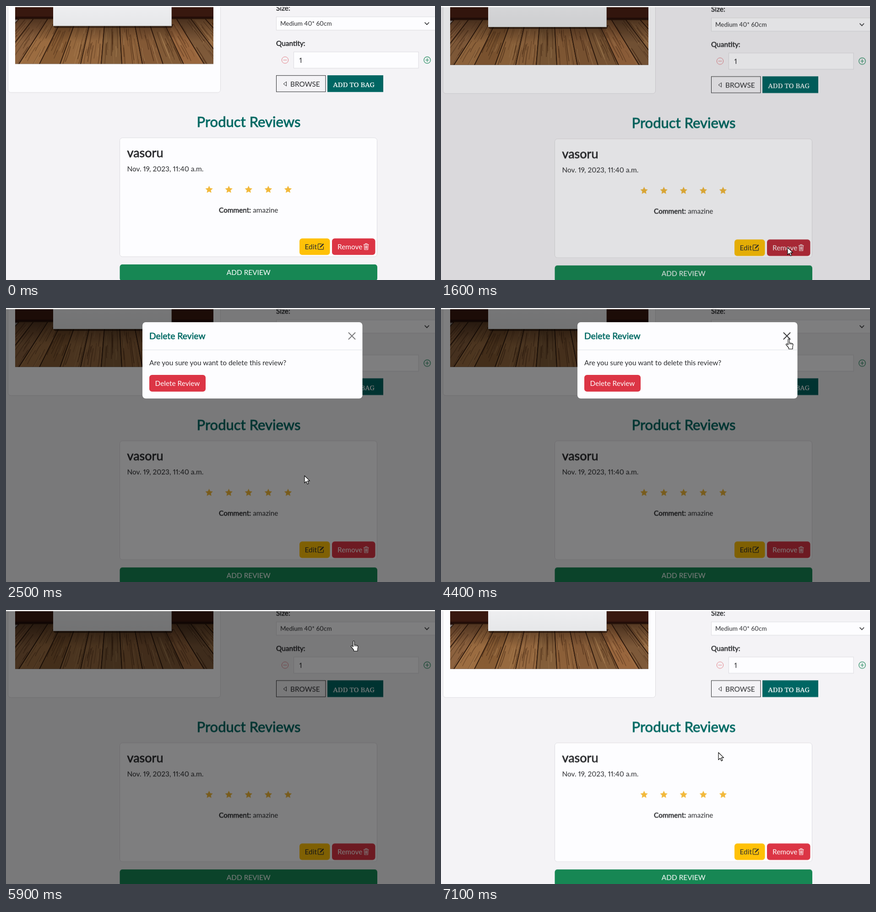
These frames come from a looping animation (937x598 px, 7200 ms). An HTML page:

```html
<!DOCTYPE html>
<html lang="en">
<head>
<meta charset="utf-8">
<title>Delete review</title>
<style>
  html, body { margin: 0; width: 100%; height: 100%; overflow: hidden; background: #f4f3f6; }
  svg { display: block; }
  text { font: 15.4px Lato, sans-serif; font-variant-numeric: proportional-nums; fill: currentColor; }
  .strong { stroke: currentColor; stroke-width: .55px; }
  .h2 { font-size: 31px; stroke-width: .9px; }
  .h3 { font-size: 27px; stroke-width: .8px; }
  .h5 { font-size: 19.3px; stroke-width: .6px; }
  .small { font-size: 13.5px; }
  .serif { font: 15px "Noto Serif", serif; stroke: currentColor; stroke-width: .2px; }
  .mid { text-anchor: middle; }
  .panel { fill: #fdfdff; stroke: #dddce0; }
  .line { fill: none; stroke: currentColor; }

  #page, #backdrop, #modal, #mouse, #remove, #close, .arrow, .hand {
    animation: 7200ms step-end infinite;
  }
  #page { animation-name: scroll; }
  #backdrop { animation-name: dim; }
  #modal { animation-name: dialog; }
  #remove { animation-name: remove; }
  #close { animation-name: close; }
  #mouse { animation-name: travel; }
  .arrow { animation-name: arrow; }
  .hand { animation-name: hand; }

  @keyframes scroll {
    0% { transform: translateY(-2.3px); }
    12.5%, 100% { transform: none; }
  }
  @keyframes dim {
    0% { opacity: 0; }
    22.222% { opacity: .107; }
    23.611% { opacity: .44; }
    25% { opacity: .5; }
    83.333% { opacity: .39; }
    84.722% { opacity: .055; }
    86.111%, 100% { opacity: 0; }
  }
  @keyframes dialog {
    0% { opacity: 0; transform: translateY(-48px); }
    25% { opacity: .55; transform: translateY(-28px); }
    26.388% { opacity: 1; transform: translateY(-9px); }
    27.777% { opacity: 1; transform: none; }
    79.166% { opacity: .78; transform: translateY(-9px); }
    80.555% { opacity: .11; transform: translateY(-31px); }
    81.944%, 100% { opacity: 0; transform: translateY(-48px); }
  }
  @keyframes remove {
    0% { fill: #dc3545; }
    15.277% { fill: #bb2d3b; }
    23.611%, 100% { fill: #dc3545; }
  }
  @keyframes close {
    0% { color: #7b7b7d; }
    58.333%, 100% { color: #3c3c3e; }
  }
  @keyframes travel {
    0% { transform: translate(800px, 600px); }
    6.944% { transform: translate(800px, 600px); animation-timing-function: steps(6); }
    15.277% { transform: translate(757px, 527px); }
    22.222% { transform: translate(757px, 527px); animation-timing-function: steps(9); }
    34.722% { transform: translate(652px, 366px); }
    41.666% { transform: translate(652px, 366px); animation-timing-function: steps(12); }
    58.333% { transform: translate(753px, 67px); }
    90.277% { transform: translate(753px, 67px); animation-timing-function: steps(6); }
    98.611%, 100% { transform: translate(606px, 311px); }
  }
  @keyframes arrow {
    0% { opacity: 1; }
    15.277% { opacity: 0; }
    22.222% { opacity: 1; }
    58.333% { opacity: 0; }
    83.333%, 100% { opacity: 1; }
  }
  @keyframes hand {
    0% { opacity: 0; }
    15.277% { opacity: 1; }
    22.222% { opacity: 0; }
    58.333% { opacity: 1; }
    83.333%, 100% { opacity: 0; }
  }
</style>
</head>
<body>
<svg width="937" height="598" viewBox="0 0 937 598" color="#2b2c2f">
  <defs>
    <clipPath id="photo"><rect x="20" y="-10" width="433" height="138.5"/></clipPath>
    <linearGradient id="shade" x1="0" y1="0" x2="0" y2="1">
      <stop offset="0" stop-color="#1c0d06" stop-opacity=".6"/>
      <stop offset=".5" stop-color="#1c0d06" stop-opacity=".12"/>
      <stop offset="1" stop-color="#1c0d06" stop-opacity=".1"/>
    </linearGradient>
    <linearGradient id="canvasTone" x1="0" y1="0" x2="0" y2="1">
      <stop offset="0" stop-color="#f0f0f2"/>
      <stop offset="1" stop-color="#e6e7e9"/>
    </linearGradient>
  </defs>
  <rect width="937" height="598" fill="#f4f3f6"/>

  <g id="page">
    <rect class="panel" x="4.5" y="-20" width="464" height="211" rx="6"/>
    <g clip-path="url(#photo)">
      <rect x="20" y="-10" width="433" height="42" fill="#38180f"/>
      <path d="M20 28H453" stroke="#220d08" stroke-width="5"/>
      <g id="floor"></g>
      <rect x="20" y="30" width="433" height="99" fill="url(#shade)"/>
      <path d="M101 42H366L362 50H106Z" fill="#140a06" opacity=".55"/>
      <rect x="103" y="-10" width="259" height="56" fill="url(#canvasTone)"/>
      <path d="M103 45.5H362" stroke="#c4c8c8"/>
      <path d="M361.5 -10V46" stroke="#a9a5a3"/>
    </g>

    <text class="strong" x="590" y="12">Size:</text>
    <rect class="panel" x="590.5" y="26" width="360" height="29"/>
    <text class="small" x="599" y="45">Medium 40* 60cm</text>
    <path class="line" d="M914.5 38L919.3 42.8 924 38" stroke-width="1.6"/>
    <text class="strong" x="590" y="89">Quantity:</text>
    <g class="line" color="#e27f86"><circle cx="609.5" cy="120.3" r="7.2"/><path d="M605.5 120.3H613.5"/></g>
    <rect class="panel" x="628.5" y="102.5" width="272.5" height="35.5"/>
    <text x="640.5" y="126">1</text>
    <g class="line" color="#218a5e" stroke-width="1.2"><circle cx="920" cy="120.3" r="7.2"/><path d="M916 120.3H924M920 116.3V124.3"/></g>
    <rect class="line" x="590.5" y="154" width="107.5" height="35.5"/>
    <path class="line" d="M612.5 167.5V177L606 172.3Z"/>
    <text x="621" y="178">BROWSE</text>
    <rect x="702" y="153.5" width="122" height="36.5" fill="#006663"/>
    <text class="serif" x="714.3" y="179.3" color="#fff">ADD TO BAG</text>

    <text class="strong h2 mid" x="530" y="266.5" color="#006a64">Product Reviews</text>
    <rect class="panel" x="248.5" y="290" width="562" height="259.5" rx="6"/>
    <text class="strong h3" x="264.5" y="332.5">vasoru</text>
    <text x="264.5" y="363">Nov. 19, 2023, 11:40 a.m.</text>
    <g id="stars" fill="#f2b93b"></g>
    <text class="mid" x="529.8" y="453.5"><tspan class="strong">Comment:</tspan> amazine</text>

    <rect x="641" y="509.5" width="66.5" height="36" rx="6" fill="#ffc107"/>
    <text x="652.5" y="533">Edit</text>
    <g transform="translate(680 519.5) scale(.96)">
      <path class="line" d="M10 2H2.5Q1.5 2 1.5 3V13.5Q1.5 14.5 2.5 14.5H13Q14 14.5 14 13.5V8" stroke-width="1.2"/>
      <path d="M5.3 10.7L6.3 8 13 1.2 15 3.2 8.2 9.8Z" fill="currentColor"/>
    </g>
    <rect id="remove" x="712" y="509.5" width="94.5" height="36" rx="6" fill="#dc3545"/>
    <g color="#fff">
      <text x="724" y="533">Remove</text>
      <path class="line" transform="translate(779 519.5) scale(.96)" stroke-width="1.1" d="M2 3.5H14M6 3.5V1.3H10V3.5M3.3 3.5L4.2 15.2H11.8L12.7 3.5M6 5.5L6.3 13M8 5.5V13M10 5.5L9.7 13"/>
      <rect x="248.5" y="566" width="562.5" height="36.5" rx="6" fill="#178754"/>
      <text class="mid" x="529.8" y="589">ADD REVIEW</text>
    </g>
  </g>

  <rect id="backdrop" width="937" height="598" opacity="0"/>

  <g id="modal" opacity="0">
    <rect x="298" y="31" width="480.5" height="166.5" rx="7" fill="#fdfdff"/>
    <path d="M298 91.5H778.5" stroke="#dfe2e6"/>
    <text class="strong h5" x="313" y="68" color="#006a64">Delete Review</text>
    <path id="close" class="line" d="M748.5 54L762.5 68M762.5 54L748.5 68" stroke-width="2" stroke-linecap="round"/>
    <text x="313" y="125">Are you sure you want to delete this review?</text>
    <rect x="313" y="146" width="123" height="36.5" rx="6" fill="#dc3545"/>
    <text class="mid" x="374.5" y="170" color="#fff">Delete Review</text>
  </g>

  <rect width="937" height="2.5" fill="#fdfdfd"/>

  <g id="mouse" fill="#fff" stroke="#111" stroke-width="1.2" stroke-linejoin="round">
    <path class="arrow" d="M0 0V16L3.8 12.4 6.4 18.4 9 17.2 6.5 11.4H11.5Z"/>
    <g class="hand">
      <path d="M5 2Q5 .5 6.5 .5T8 2V9L13 10Q16 10.5 16 13L15 18V22.5H6.5V20L1 13.5Q0 12 1.5 11.3T5 13.5Z"/>
      <path d="M8 9V12.5M10.7 9.8V12.7M13.3 10.3V13" stroke-width="1"/>
    </g>
  </g>
</svg>
<script>
  const svgNS = 'http://www.w3.org/2000/svg';
  const addPath = (parent, d, attrs = {}) => {
    const path = document.createElementNS(svgNS, 'path');
    for (const [name, value] of Object.entries({ d, ...attrs })) path.setAttribute(name, value);
    parent.append(path);
  };

  let seed = 17;
  const random = () => (seed = seed * 16807 % 2147483647) / 2147483647;

  // Floorboards fan out from a vanishing point above the photo.
  function drawFloor(floor) {
    const far = 30, near = 129, boardWidth = 45;
    const point = (x, y) => `${(235 + (x - 235) * (y + 195) / (near + 195)).toFixed(1)} ${y.toFixed(1)}`;
    for (let x = -62; x < 530; x += boardWidth) {
      const right = x + boardWidth;
      const fill = `hsl(${27 + random() * 4} ${36 + random() * 9}% ${39 + random() * 9}%)`;
      addPath(floor, `M${point(x, far)}L${point(right, far)} ${point(right, near)} ${point(x, near)}Z`,
        { fill, stroke: '#2c180c', 'stroke-width': 1.6 });
      for (let i = 0; i < 13; i++) {
        const grain = x + 3 + random() * (boardWidth - 6);
        const start = far + random() * 70;
        const end = Math.min(near, start + 15 + random() * 45);
        const bend = grain + random() * 6 - 3;
        addPath(floor, `M${point(grain, start)}Q${point(bend, (start + end) / 2)} ${point(grain, end)}`,
          { fill: 'none', stroke: i % 4 ? '#4a2a14' : '#c09462', 'stroke-width': .7 + random() * 1.3, opacity: .5 });
      }
    }
  }

  function drawStars(row) {
    for (let i = 0; i < 5; i++) {
      const points = Array.from({ length: 10 }, (_, k) => {
        const radius = k % 2 ? 4.1 : 8.6;
        const angle = (k / 5 - .5) * Math.PI;
        return `${(443.6 + 43.1 * i + radius * Math.cos(angle)).toFixed(2)} ${(403.2 + radius * Math.sin(angle)).toFixed(2)}`;
      });
      addPath(row, `M${points.join('L')}Z`);
    }
  }

  drawFloor(document.getElementById('floor'));
  drawStars(document.getElementById('stars'));
</script>
</body>
</html>
```
